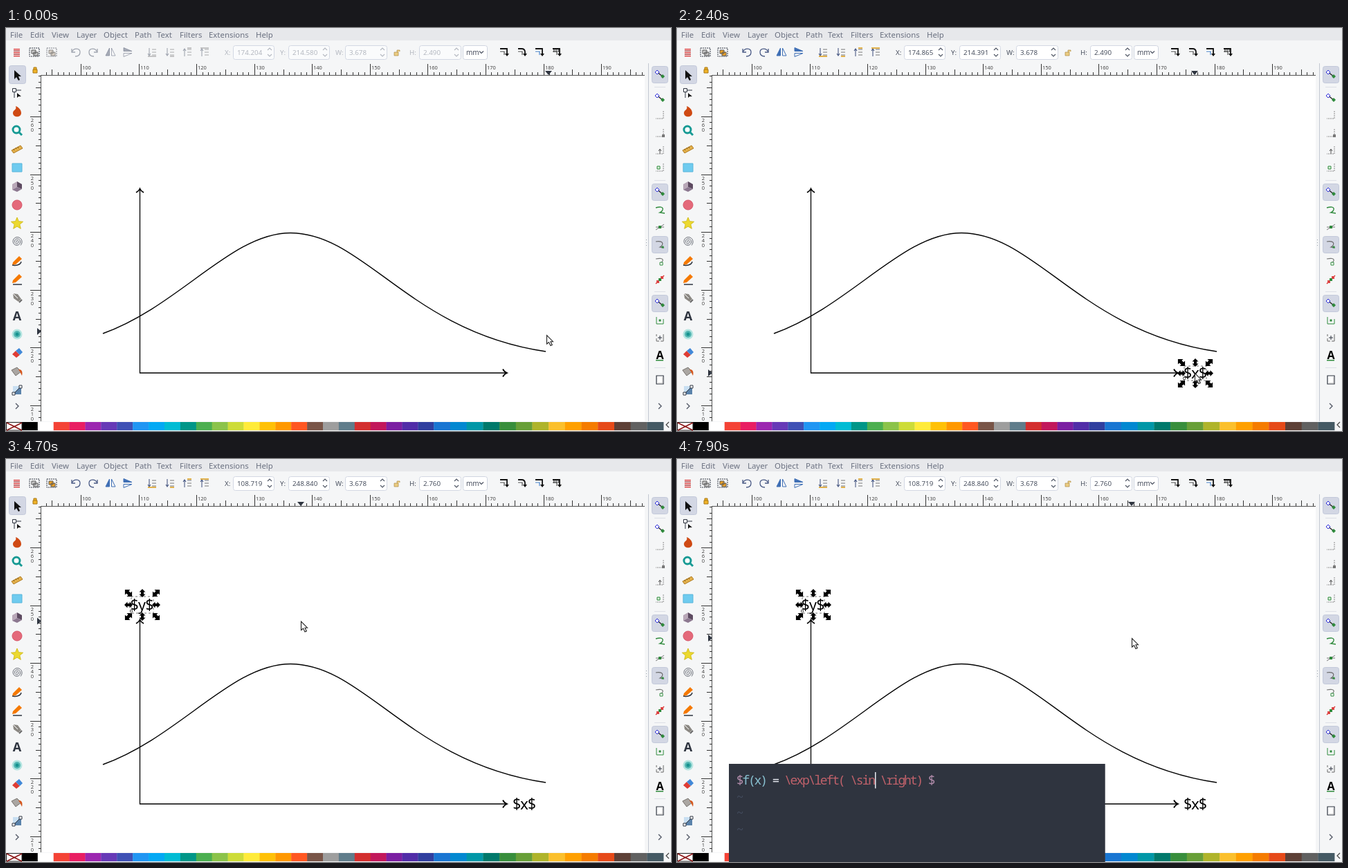
Write an HTML page with a canvas that moves like this. It is 961x583 px and loops after 8 s.

```html
<!DOCTYPE html>
<html lang="en">
<head>
<meta charset="utf-8">
<title>Vector editor with a formula prompt</title>
<style>
html, body { margin: 0; width: 100%; height: 100%; overflow: hidden; background: #f5f6f7; }
canvas { display: block; }
</style>
</head>
<body>
<canvas id="stage" width="961" height="583"></canvas>
<script>
const c = document.getElementById('stage').getContext('2d');
const LOOP = 8000, UNIT = 8.358;
const SANS = '"Noto Sans", "Open Sans", sans-serif', MONO = '"Noto Sans Mono", "DejaVu Sans Mono", monospace';
const INK = '#2f3540', BLUE = '#2626d9', GREEN = '#2f8a3c', ORANGE = '#f57900';

// ---- drawing helpers
function rect(x, y, w, h, color) { c.fillStyle = color; c.fillRect(x, y, w, h); }

function shape(x, y, d, fill, stroke, width = 1, dash = []) {
  const path = new Path2D(d);
  c.save();
  c.translate(x, y);
  c.setLineDash(dash);
  if (fill) { c.fillStyle = fill; c.fill(path); }
  if (stroke) { c.strokeStyle = stroke; c.lineWidth = width; c.stroke(path); }
  c.restore();
}

function text(s, x, y, size, color, family = SANS, align = 'left', weight = 400) {
  c.font = `${weight} ${size}px ${family}`;
  c.textAlign = align;
  c.fillStyle = color;
  c.fillText(s, x, y);
}

function box(x, y, w, h, fill, stroke) {
  c.beginPath();
  c.roundRect(x + .5, y + .5, w - 1, h - 1, 3);
  if (fill) { c.fillStyle = fill; c.fill(); }
  if (stroke) { c.strokeStyle = stroke; c.lineWidth = 1; c.stroke(); }
}

const disc = (r, x = 0, y = 0) => `M${x - r} ${y}a${r} ${r} 0 1 0 ${2 * r} 0a${r} ${r} 0 1 0 ${-2 * r} 0z`;
const square = (x, y, s = 4) => `M${x - s / 2} ${y - s / 2}h${s}v${s}h${-s}z`;
const star = Array.from({ length: 10 }, (_, i) => {
  const r = i % 2 ? 4 : 9, a = i * Math.PI / 5;
  return `${i ? 'L' : 'M'}${r * Math.sin(a)} ${-r * Math.cos(a)}`;
}).join('') + 'z';
const spiral = 'M0 0' + Array.from({ length: 60 }, (_, i) =>
  `L${i / 8 * Math.cos(i / 3)} ${i / 8 * Math.sin(i / 3)}`).join('');

// ---- icons: [y, [path, fill, stroke, width, dash], ...]
const TOOLS = [
  [68, ['M-4-7V6L-1 3 2 8 4 7 2 2H6z', '#111']],
  [94, [square(-4, -4, 5), null, INK], ['M-4-1V7M-1-4H6', null, INK], ['M0 0V7L2 5H6z', '#111']],
  [121, ['M-6 2C-6-3 0-2-2-8 3-6 6-2 6 2 6 9-6 9-6 2z', '#cf4a14']],
  [148, [disc(5, -1, -1), '#fff', '#179a94', 3], ['M3 3 7 7', null, '#179a94', 3]],
  [175, ['M-8 2 5-5 8-1-5 6z', '#e3b04b', '#b07a20'], ['M-4 2-5 0M-1 0-2-2M2-1 1-3', null, '#7a5410']],
  [202, ['M-7-6H7V6H-7z', '#6fcbef', '#58b5da']],
  [229, ['M-7-3 0-7V1L-7 5z', '#b9a8b8'], ['M0-7 7-3V4L0 1z', '#5d4a60'], ['M-7 5 0 1 7 4 0 8z', '#8c7890']],
  [256, [disc(7), '#e4697a', '#d65567']],
  [283, [star, '#ecd92f', '#d2bd1c']],
  [309, [spiral, null, '#444a55', .8]],
  [336, ['M-6 3 3-6 7-2-2 6-7 7z', ORANGE], ['M-7 7C-2 8 5 7 6 2', null, INK, 1.5]],
  [363, ['M-6 2 3-7 7-3-2 5-7 6z', ORANGE], ['M-6 8H7', null, INK, 1.5]],
  [390, ['M-6-6 1-5 6 2 2 6-5 1z', '#8b8883'], ['M-6-6 1 1', null, '#fff'], ['M3 7 7 3', null, '#666', 2]],
  [443, [disc(7.5), '#b5e5e1'], [disc(5), '#55b7b3'], [disc(2.5), '#16938f']],
  [470, ['M-7 2-2-3 4 3-1 7z', '#df3d35'], ['M-2-3 3-7 8-1 4 3z', '#4188d8']],
  [497, ['M-8-2 0-6 6 0-2 6z', '#aaa6a2', '#77736f'], ['M2-3C8-4 8 2 7 6L4 0z', '#d5581f']],
  [524, ['M-6-6H6V6H-6z', '#c8dff2'], ['M-6 6 6-6V6z', '#5b83ab'], ['M-5 5 5-5', null, INK], [square(-5, 5) + square(5, -5), '#fff', INK]],
  [547, ['M-2-4 2 0-2 4', null, '#555b68', 1.4]],
];

const nodes = [['M-4-3 4 3', null, '#222', 1.3], ['M-4-6-1-3-4 0-7-3z', '#fff', BLUE], ['M4 0 7 3 4 6 1 3z', GREEN]];
const corner = ['M5-6V5H-6', null, '#888', 1, [2, 1]];
const SNAPS = [
  [67, ...nodes], [101, ...nodes],
  [126, corner], [152, corner, [square(5, 4), '#777']],
  [177, corner, ['M0-1V5M-2 1 0-2 2 1', null, '#555']],
  [202, corner, [square(-2, 0), '#d8efd8', GREEN]],
  [237, ...nodes],
  [263, ['M-6-3C8-7 5 2 0 4L7 5', null, GREEN, 1.4]],
  [288, ['M-6 4 6-4M-6 0H6', null, '#777'], [square(0, 0), GREEN]],
  [313, ['M-6-4C8-6 4 2 0 4L6 5', null, '#666', 1.2], [square(4, 4, 3), GREEN]],
  [338, ['M-6-4C8-7 5 1 0 2', null, '#777', 1.2], [square(2, 3), '#fff', GREEN]],
  [364, ['M-6 6 6-6', null, '#d33', 1.4], [square(-3, 3) + square(3, -3), '#d44'], [square(0, 0), GREEN]],
  [398, ...nodes],
  [423, ['M-5-5V5H5V-2', null, GREEN], [square(0, 0, 3), GREEN]],
  [448, ['M-5 5V1M-5 5H-1M5-5V5H1M-5-5V-2', null, '#666'], ['M0-3V3M-3 0H3', null, INK]],
  [509, ['M-5-6H5V6H-5z', '#fff', INK, 1.2], ['M-3 5H4V-4', null, '#aaa']],
  [547, ['M-2-4 2 0-2 4', null, '#555b68', 1.4]],
];

function iconColumn(x, icons) {
  for (const [y, ...parts] of icons) for (const part of parts) shape(x, y, ...part);
}

// ---- the window around the page
const MENU = { File: 6, Edit: 35, View: 66, Layer: 102, Object: 141, Path: 186, Text: 218, Filters: 251, Extensions: 293, Help: 361 };
const PALETTE = ('000 fff f44336 e91e63 9c27b0 673ab7 3f51b5 2196f3 03a9f4 00bcd4 009688 4caf50 8bc34a cddc39 ffeb3b ffc107 ff9800 ' +
  'ff5722 795548 9e9e9e 607d8b d32f2f c2185b 7b1fa2 512da8 303f9f 1976d2 0288d1 0097a7 00796b 388e3c 689f38 afb42b fbc02d ' +
  'ffa000 f57c00 e64a19 5d4037 616161 455a64').split(' ');

function frame() {
  rect(0, 0, 961, 583, '#f5f6f7');
  rect(0, 0, 961, 18, '#e7e8eb');
  for (const name in MENU) text(name, MENU[name], 13.5, 11.4, '#6a7080');

  rect(51, 68, 872, 501, '#fff');
  rect(928, 51, 1, 518, '#c3c8d2');
  for (let y = 306; y < 316; y += 4) rect(925, y, 1, 1, '#9aa0ab');

  box(4, 54, 25, 27, '#d3d7e4', '#c3c9da');
  iconColumn(16, TOOLS);
  text('A', 16, 423, 18, INK, SANS, 'center', 700);
  for (const y of [67, 237, 313, 398]) box(933, y - 12, 24, 25, '#d3d7e4', '#c3c9da');
  for (const y of [85, 220, 381, 491]) rect(937, y, 16, 1, '#dcdfe6');
  iconColumn(945, SNAPS);
  text('A', 945, 479, 16, '#000', SANS, 'center', 700);
  rect(939, 480, 11, 1.5, GREEN);

  // the later swatches are slightly wider
  const edge = i => i * 22.9 + Math.max(0, i - 27) * .8;
  PALETTE.forEach((color, i) => rect(edge(i + 1), 570, edge(i + 2) - edge(i + 1) + .3, 12, '#' + color));
  shape(0, 570, 'M.5.5H23V12H.5z', '#fff', '#222');
  shape(0, 570, 'M1 1 23 12M23 1 1 12', null, '#8c1515', 1.5);
  shape(956, 574, 'M2-4-2 0 2 4', null, '#444', 1.2);
}

function rulers(marker) {
  const tick = n => n % 10 === 0 ? 16 : n % 5 === 0 ? 8 : 4;
  rect(51, 68, 872, 1, '#555');
  rect(50, 68, 1, 501, '#555');
  for (let n = 94; n <= 197; n++) {
    const x = Math.round(109 + (n - 100) * UNIT);
    rect(x - 1, 68 - tick(n), 1, tick(n), '#333');
    if (n % 10 === 0) text(n, x + 1, 59.5, 7.5, '#444');
  }
  for (let n = 208; n <= 267; n++) {
    const y = Math.round(128 + (260 - n) * UNIT);
    rect(51 - tick(n), y, tick(n), 1, '#333');
    if (n % 10 === 0) [...String(n)].forEach((d, i) => text(d, 38, y + 8 + i * 7.2, 7.5, '#444', SANS, 'center'));
  }
  shape(42, 61, 'M-3-1H3V4H-3zM-2-1V-4H2V-1', '#f0b429', '#a87713');
  shape(marker.x, 62, 'M-5 0H5L0 6z', INK);
  shape(45, marker.y, 'M0-5V5L6 0z', INK);
}

function toolbar(t) {
  const active = t >= 2400, color = active ? '#4a5160' : '#b4b8c0';
  const [x, y, h] = t < 2400 ? ['174.204', '214.580', '2.490'] : t < 4200 ? ['174.865', '214.391', '2.490'] : ['108.719', '248.840', '2.760'];
  const fields = [['X:', 316, 328, 60, x], ['Y:', 396, 408, 60, y], ['W:', 476, 490, 61, '3.678'], ['H:', 583, 597, 61, h]];
  for (const [label, lx, bx, w, value] of fields) {
    box(bx, 25, w, 21, active ? '#fff' : '#fafbfc', '#d3d8e3');
    text(label, lx, 38.5, 9.8, color);
    text(value, bx + 6, 38.5, 9.8, color);
    shape(bx + w - 7, 35, 'M-3-3 0-6 3-3M-3 3 0 6 3 3', null, color, 1.1);
  }
  box(660, 25, 36, 21, '#fff', '#cfd4e0');
  text('mm', 665, 38.5, 10, '#4a5160');
  shape(687, 35, 'M-3-1.5 0 1.5 3-1.5', null, '#4a5160', 1.2);

  for (let i = 0; i < 5; i++) rect(11, 30 + i * 2.5, 9, 1.3, i % 2 ? '#a33' : '#d33');
  const frameIcon = (ix, fill) => {
    shape(ix, 35, 'M-7-6H7V6H-7z', null, INK, 1, [2, 1]);
    shape(ix, 35, 'M-4-3H2V2H-4zM-1 0H5V5H-1z', fill, '#555');
  };
  frameIcon(41, '#ccc');
  c.globalAlpha = active ? 1 : .6;
  frameIcon(66, active ? '#f6a623' : '#c8b9a6');
  const line = active ? '#4a5a85' : '#687080';
  shape(101, 35, 'M-6-5V0H-1M-6 0C-3-7 6-6 6 0 6 4 3 6-1 6', null, line, 1.3);
  shape(126, 35, 'M6-5V0H1M6 0C3-7-6-6-6 0-6 4-3 6 1 6', null, line, 1.3);
  const flip = active ? '#3f6fb5' : '#737b8c';
  shape(151, 35, 'M-1.5-6V5H-7z', flip, flip);
  shape(151, 35, 'M1.5-6V5H7z', null, flip);
  shape(176, 35, 'M-6-1.5H6L-6-6.5z', flip, flip);
  shape(176, 35, 'M-6 1.5H6L-6 6.5z', null, flip);
  [211, 237, 262, 287].forEach((ix, i) => {
    const up = i > 1, edge = i % 3 === 0;
    shape(ix, 35, up ? 'M-4 6V-5M-6-2-4-5-2-2' : 'M-4-6V5M-6 2-4 5-2 2', null, line, 1.1);
    shape(ix, 35, 'M0-4H6M0 0H6M0 4H6', null, '#777', 1);
    shape(ix, 35, `M${edge ? -6 : 0} ${up ? -6 : 6}h${edge ? 12 : 6}`, null, active ? '#dd9a12' : '#888', 1.5);
  });
  c.globalAlpha = .65;
  shape(564, 36, 'M-3-1H3V4H-3zM1-1V-4H5V-2', '#e5b544', '#a88640');
  c.globalAlpha = 1;
  [719, 745, 770, 795].forEach((ix, i) => {
    shape(ix, 35, i === 1 ? 'M-5-5H0Q5-5 5 0V2' : 'M-5-5H5V2', null, '#111', 1.8);
    shape(ix, 35, 'M-5-1H1V4', null, i === 2 ? '#4a86cf' : '#555', 1.2);
    shape(ix, 35, 'M5 6 2 2H8z', '#111');
    if (i === 3) shape(ix, 35, 'M-3-4V0M0-4V0M3-4V0', null, '#111');
  });
}

// ---- the page
function label(s, x, y) {
  c.fontStretch = 'extra-condensed';
  [...s].forEach((ch, i) => text(ch, x + (i - 1) * 10.9, y + 7.5, 21.5, '#000', MONO, 'center', 500));
  c.fontStretch = 'normal';
}

function selection(x, y, h) {
  shape(x, y, `M-16 ${-h}H16V${h}H-16z`, null, '#777', 1, [3, 3]);
  shape(x - 16, y + h - 3, square(0, 0, 3), '#fff', '#333', .8);
  for (const i of [-1, 0, 1]) for (const j of [-1, 0, 1]) {
    if (!i && !j) continue;
    const size = i && j ? 1.2 : 1;
    c.save();
    c.translate(x + i * 20, y + j * (h + 5));
    c.rotate(Math.atan2(j, i));
    c.scale(size, size);
    shape(0, 0, 'M-6 0-1.5-4.5V-2H1.5V-4.5L6 0 1.5 4.5V2H-1.5V4.5z', '#000');
    c.restore();
  }
}

function page(t) {
  shape(0, 0, 'M140 442C251 402 326 296.5 411 296.5 518 296.5 583 439 780 468', null, '#000', 1.4);
  shape(0, 0, 'M193.5 233V499H723', null, '#000', 1.3);
  shape(0, 0, 'M188 238Q192 236 193.5 232.5 195 236 199 238M718 493.5Q720 497.5 724 499 720 500.5 718 504.5', null, '#000', 1.7);
  if (t >= 2400) label('$x$', 749, 499.5);
  if (t >= 4200) label('$y$', 196.5, 211);
  if (t >= 4200) selection(197, 211, 12);
  else if (t >= 2400) selection(749, 499.5, 10.5);
}

// ---- the editor: "|" is the insert bar, "#" the block cursor
const SAVED = '"tmpamq_x87c" 1L, 4C [w]';
const EDITS = [
  [0], [1700, '#'], [1900, '$x|$'], [2200, '$#x$'], [2300, '$x$', SAVED], [2400],
  [3500, '#'], [3700, '$|$'], [3900, '$y|$'], [4000, '$#y$'], [4100, '$y$', SAVED], [4200],
  [5300, '#'], [5400, '#$$'], [5500, '$|$'], [5900, '$f|$'], [6000, '$f(|$'], [6100, '$f(x|$'],
  [6300, '$f(x)|$'], [6400, '$f(x) |$'], [6500, '$f(x) =|$'], [6600, '$f(x) = |$'], [6700, '$f(x) = e|$'],
  [6900, '$f(x) = ex|$'], [7000, '$f(x) = \\exp|$'],
  ...[[7200, ''], [7400, 's'], [7500, 'si'], [7900, '\\sin']].map(([at, s]) => [at, `$f(x) = \\exp\\left( ${s}| \\right) $`]),
];
const CELL = 8.66, ROW = 23.7, LEFT = 86.7, TOP = 453;

function cells(s, col, row, color) {
  [...s].forEach((ch, i) => text(ch, LEFT + (col + i + .5) * CELL, TOP + 18 + row * ROW, 18, color, MONO, 'center'));
}

function editor(t) {
  const [, edit, status] = EDITS.findLast(e => e[0] <= t);
  if (!edit) return;
  const line = edit.replace(/[|#]/, ''), bar = edit.indexOf('|'), block = edit.indexOf('#');
  rect(75, 441, 543.7, 142, '#2f343f');
  c.fontStretch = 'extra-condensed';
  if (line) for (let row = 1; row < 4; row++) cells('~', 0, row, '#434c5e');
  for (const { 0: token, index } of line.matchAll(/\\[a-z]+[()]?|./g)) {
    const paired = token === '$' && edit.includes('|$') || /[()]/.test(token) && edit.includes(')|');
    if (paired) rect(LEFT + index * CELL, TOP, CELL, 23, '#3f4b60');
    cells(token, index, 0, paired ? '#7b9cc0' : token === '$' ? '#b48ead' : token[0] === '\\' ? '#bf616a' : token === '=' ? '#e5e9f0' : '#88c0d0');
  }
  if (bar >= 0) rect(Math.round(LEFT + bar * CELL), TOP, 1.5, 23.5, '#e5e9f0');
  if (block >= 0) {
    rect(Math.round(LEFT + block * CELL), TOP, 9, 23, '#d8dee9');
    cells(line[block] || '', block, 0, INK);
  }
  if (status) cells(status, 0, 4 + .5 / ROW, '#e5e9f0');
  c.fontStretch = 'normal';
}

// ---- the pointer: [start, steps, x, y], moved in steps of 100 ms
const MOVES = [[100, 4, 748, 498], [700, 1, 748, 499], [2600, 6, 195, 210], [4600, 4, 657, 259]];

function track(t, x, y) {
  for (const [start, steps, toX, toY] of MOVES) {
    const p = Math.min(1, Math.max(0, (Math.floor((t - start) / 100) + 1) / steps));
    const e = p * p * (3 - 2 * p);
    x += (toX - x) * e;
    y += (toY - y) * e;
  }
  return { x, y };
}

function paint(now) {
  const t = now % LOOP, pointer = track(t, 781, 444);
  frame();
  rulers(track(t, 784, 439));
  toolbar(t);
  page(t);
  editor(t);
  shape(pointer.x + .5, pointer.y + .5, 'M0 0V12.5L3 10 5.5 15 7.8 14 5.5 9.2H9z', '#fff', '#222', 1.1);
}

let begin;
function tick(now) {
  begin ??= now;
  paint(now - begin);
  requestAnimationFrame(tick);
}
paint(0);
requestAnimationFrame(tick);
</script>
</body>
</html>
```
